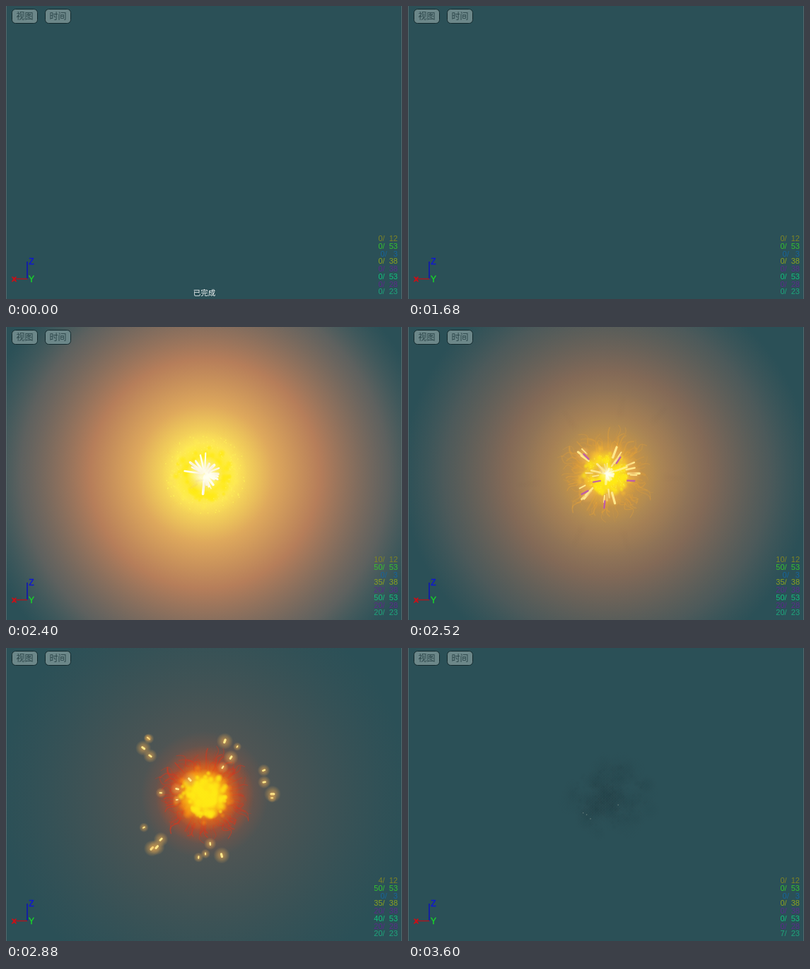
An HTML page with a canvas that plays this animation: 560 px wide and 415 px high, repeating every 3.72 s.

```html
<!DOCTYPE html>
<html lang="zh">
<head>
<meta charset="utf-8">
<title>Particle burst</title>
<style>
  html, body { margin: 0; width: 100%; height: 100%; overflow: hidden; background: #2b5057; }
  #stage { position: relative; width: 560px; height: 415px; overflow: hidden; }
  canvas, svg { position: absolute; left: 0; top: 0; }
  text { white-space: pre; font: 11px "Liberation Sans", Arial, sans-serif; }
  .cjk { font-family: "Noto Sans CJK SC", "Noto Sans CJK", sans-serif; text-anchor: middle; }
  .button rect { fill: #6c8789; stroke: #142a2e; }
  .button text { font-size: 12px; fill: #294347; }
  #done { font-size: 10.5px; fill: #f4f8f8; }
  .axis path { fill: none; stroke-width: 1.5; }
  .axis text { font-size: 12px; text-anchor: middle; stroke-width: .4; }
  .axis .x { font-size: 9px; stroke-width: 1.2; }
  #counters text { text-anchor: end; }
</style>
</head>
<body>
<div id="stage">
  <canvas id="view" width="560" height="415"></canvas>
  <svg width="560" height="415" viewBox="0 0 560 415">
    <path d="M.5 0V415M559.5 0V415" stroke="#657577" opacity=".7"/>
    <g class="button">
      <rect x="8.5" y="4.5" width="36" height="20" rx="5"/>
      <text class="cjk" x="26.5" y="19">视图</text>
      <rect x="55.5" y="4.5" width="36" height="20" rx="5"/>
      <text class="cjk" x="73.5" y="19">时间</text>
    </g>
    <g class="axis">
      <path d="M30 362V386" stroke="#0c12b8"/>
      <path d="M12 386.5H30" stroke="#a81820"/>
      <text class="x" x="11.5" y="390" fill="#c81018" stroke="#c81018">X</text>
      <text x="36" y="366" fill="#1018d0" stroke="#1018d0">Z</text>
      <text x="36" y="391" fill="#18d828" stroke="#18d828">Y</text>
    </g>
    <g id="counters"></g>
    <text id="done" class="cjk" x="280.5" y="410">已完成</text>
  </svg>
</div>
<script>
const LOOP = 3720, STEP = 120, FIRST = 360, BURST = 2280;
const CX = 281, CY = 208, TAU = 2 * Math.PI;
const ctx = document.getElementById('view').getContext('2d');
const done = document.getElementById('done');

// each emitter: live particles fall from peak to none between two ages
const emitters = [
  { color: '#7f8424', total: 12, peak: 10, from: 420, to: 720 },
  { color: '#34c22e', total: 53, peak: 50, from: 650, to: 1250 },
  { color: '#17659c', total: 3, peak: 0, from: 0, to: 1 },
  { color: '#8ca21f', total: 38, peak: 35, from: 660, to: 1270 },
  { color: '#5c2a8a', total: 38, peak: 20, from: 600, to: 1080 },
  { color: '#12c07c', total: 53, peak: 50, from: 540, to: 840 },
  { color: '#5c2a8a', total: 28, peak: 20, from: 600, to: 1080 },
  { color: '#1fa57c', total: 23, peak: 20, from: 1000, to: 1500 }
];

// main directions of the sparks, as offsets after 600 ms
const jets = [[-68, -62], [44, -56], [78, -16], [-82, 62], [4, 90], [-42, -12]];

const ramp = (age, a, b) => Math.min(1, Math.max(0, (age - a) / (b - a)));
const ease = (age, a, b) => { const x = ramp(age, a, b); return x * x * (3 - 2 * x); };
const pulse = (age, a, b, c, d) => ease(age, a, b) * (1 - ease(age, c, d));
const mix = (p, q, k) => p.map((v, i) => Math.round(v + (q[i] - v) * k));
const rgba = (rgb, a) => `rgba(${rgb},${a})`;

function random(seed) {
  return () => {
    seed = seed + 0x6d2b79f5 | 0;
    let x = Math.imul(seed ^ seed >>> 15, 1 | seed);
    x = x + Math.imul(x ^ x >>> 7, 61 | x) ^ x;
    return ((x ^ x >>> 14) >>> 0) / 4294967296;
  };
}

function radial(x, y, r, stops) {
  const g = ctx.createRadialGradient(x, y, 0, x, y, r);
  for (const [p, rgb, a] of stops) g.addColorStop(p, rgba(rgb, a));
  ctx.fillStyle = g;
  ctx.fillRect(x - r, y - r, 2 * r, 2 * r);
}

// a disc of one colour that is solid inside and soft at the rim
const soft = (x, y, r, rgb, alpha, solid = 0) =>
  radial(x, y, r, [[0, rgb, alpha], [solid, rgb, alpha], [1, rgb, 0]]);

function cloud(seed, n, x, y, R, min, max, rgb, alpha, solid) {
  const rnd = random(seed);
  for (let i = 0; i < n; i++) {
    const a = rnd() * TAU, d = R * rnd() ** .7, s = min + (max - min) * rnd();
    soft(x + d * Math.cos(a), y + d * Math.sin(a) * .92, s, rgb, alpha, solid);
  }
}

function streak(x, y, a, len, width, rgb, alpha) {
  const dx = len * Math.cos(a), dy = len * Math.sin(a);
  ctx.strokeStyle = rgba(rgb, alpha);
  ctx.lineWidth = width;
  ctx.beginPath();
  ctx.moveTo(x - dx, y - dy);
  ctx.lineTo(x + dx, y + dy);
  ctx.stroke();
}

const flash = age => (.4 + .6 * ramp(age, 0, 120)) * (1 - ease(age, 120, 360));

function glow(age) {
  const warm = pulse(age, 0, 240, 360, 1000), stops = [];
  for (let p = 0; p <= 1; p += .125) stops.push([p, '128,91,79', .95 * warm * (1 - p) ** 1.2]);
  radial(CX, CY, 290, stops);

  const hot = flash(age);
  radial(CX, CY, 250 + 75 * hot, [
    [0, '255,252,190', hot], [.13, '254,230,88', hot], [.3, '222,168,92', hot],
    [.5, '186,127,90', hot * .97], [.8, '126,108,100', hot * .6], [1, '95,105,102', 0]]);
}

function darkWisps(age) {
  const alpha = .07 * pulse(age, 200, 360, 360, 600), rnd = random(23);
  for (let i = 0; i < 7; i++) {
    const a = (i + rnd() * .7) / 7 * TAU, r = 80 + 20 * rnd();
    for (let d = 0; d < 30; d += 5)
      soft(CX + (r + d) * Math.cos(a), CY + (r + d) * Math.sin(a), 10 - d / 8, '36,28,28', alpha);
  }
}

function smoke(age) {
  const k = pulse(age, 540, 960, 940, 1440), drift = ramp(age, 960, 1320);
  if (!k) return;
  const x = 279 + 7 * drift, y = 198 + 13 * drift, R = 70 - 10 * drift;
  cloud(88, 130, x, y, R, 9, 23, '14,36,42', .2 * k);
  cloud(91, 120, x, y, R * .85, 2, 5, '10,30,36', .3 * k);
}

function wisps(rgb, alpha) {
  const rnd = random(31);
  for (let i = 0; i < 110; i++) {
    const a = rnd() * TAU, r = 28 + 20 * rnd(), len = 10 + 18 * rnd(), bend = (rnd() - .5) * .5;
    const p = (d, b) => [CX + d * Math.cos(a + b), CY + d * Math.sin(a + b)];
    ctx.strokeStyle = rgba(rgb, alpha * (.35 + .65 * rnd()));
    ctx.lineWidth = .8 + 1.4 * rnd();
    ctx.beginPath();
    ctx.moveTo(...p(r, 0));
    ctx.bezierCurveTo(...p(r + len * .4, bend), ...p(r + len * .7, -bend), ...p(r + len, bend * .6));
    ctx.stroke();
  }
}

function fire(age) {
  const life = 1 - ease(age, 600, 900);
  if (!life) return;
  const cool = ease(age, 340, 600), grown = ease(age, 100, 360);
  const outer = mix([222, 146, 48], [222, 74, 26], cool);

  soft(CX, CY, 118 - 28 * cool, mix([205, 128, 70], [180, 84, 55], cool), .6 * life * grown, .25);
  soft(CX, CY, 72 - 2 * cool, outer, .75 * life * grown, .4);
  cloud(7, 60, CX, CY, 50, 6, 14, outer, .22 * life * grown);
  wisps(mix([236, 165, 55], [205, 58, 34], cool), .7 * life * grown);

  const core = 1 - ease(age, 600, 860), hot = flash(age);
  const R = 26 + 16 * (1 - ease(age, 120, 340)) + 9 * cool;
  const orange = mix([255, 150, 16], [255, 238, 80], hot);
  soft(CX, CY, R * 1.45, orange, .75 * core, .35);
  cloud(12, 80, CX, CY, R * 1.25, 4, 9, orange, .4 * core, .2);
  soft(CX, CY, R * 1.05, '255,234,20', .9 * core, .45);
  cloud(5, 90, CX, CY, R * .98, 3, 8, '255,234,20', .65 * core, .25);

  if (hot) star(hot);
}

function star(k) {
  const rnd = random(19);
  soft(CX, CY, 26 * k, '255,255,225', .9 * k, .3);
  ctx.lineCap = 'round';
  for (let i = 0; i < 26; i++) {
    const a = rnd() * TAU, r = (8 + 9 * rnd()) * k;
    streak(CX + r * Math.cos(a), CY + r * Math.sin(a), a, r * .75, 1 + 3 * rnd(), '255,255,240', k);
  }
  ctx.fillStyle = rgba('255,244,90', .7 * k);
  for (let i = 0; i < 120; i++) {
    const a = rnd() * TAU, r = (34 + 24 * rnd()) * k;
    ctx.fillRect(CX + r * Math.cos(a), CY + r * Math.sin(a), 1.5, 1.5);
  }
}

function sparks(age) {
  const alpha = pulse(age, 100, 240, 600, 940);
  if (!alpha) return;
  const travel = age / 600, len = 1.8 + 5.5 * (1 - ease(age, 330, 600));
  const violet = alpha * (1 - ease(age, 340, 520)), rnd = random(63);
  ctx.lineCap = 'round';
  for (const [jx, jy] of jets) {
    for (let i = 0; i < 4; i++) {
      const dx = jx + 42 * (rnd() - .5), dy = jy + 42 * (rnd() - .5), s = .5 + .6 * rnd();
      const x = CX + dx * travel, y = CY + dy * travel, a = Math.atan2(dy, dx);
      soft(x, y, 11 * s, '225,165,80', alpha * .75);
      streak(x, y, a, len * s, 3 * s, '255,232,140', alpha);
      if (i === 3) streak(x * .9 + CX * .1, y + 8, a, 5, 2.4, '182,76,190', violet * .8);
    }
  }
  // one longer ray up to the right
  streak(CX + 50 * travel, CY - 17 * travel, -.33, 22 * travel, 3, '255,240,130', violet);
}

function embers(age) {
  const alpha = .85 * pulse(age, 600, 900, 960, 1220);
  for (const [x, y] of [[270, 183], [328, 198], [279, 217], [271, 244]]) {
    soft(x, y, 7, '170,102,64', alpha * .8);
    soft(x, y, 2, '225,150,85', alpha);
  }
  const rnd = random(9);
  ctx.fillStyle = rgba('150,165,155', .6 * pulse(age, 720, 960, 1300, 1440));
  for (let i = 0; i < 4; i++) ctx.fillRect(235 + 85 * rnd(), 163 + 85 * rnd(), 1.4, 1.4);
}

const labels = emitters.map(({ color }, i) => {
  const el = document.createElementNS('http://www.w3.org/2000/svg', 'text');
  el.setAttribute('x', 554);
  el.setAttribute('y', Math.round(333 + i * 10.75));
  el.setAttribute('fill', color);
  return document.getElementById('counters').appendChild(el);
});

function draw(t) {
  // the loop opens on a still view, then joins the tail of a burst
  let age = -1;
  if (t >= BURST) age = t - BURST;
  else if (t >= FIRST && t < 1560) age = t + 240;

  ctx.fillStyle = '#2b5057';
  ctx.fillRect(0, 0, 560, 415);
  if (age >= 0) [glow, darkWisps, smoke, fire, sparks, embers].forEach(part => part(age));

  emitters.forEach(({ total, peak, from, to }, i) => {
    const born = .5 + .5 * ramp(age, 0, 120);
    const count = age < 0 ? 0 : Math.round(peak * born * (1 - ramp(age, from, to)));
    labels[i].textContent = count + '/' + String(total).padStart(4);
  });
  done.style.display = t < FIRST ? '' : 'none';
}

let shown = -1;
const start = performance.now();
function tick() {
  const time = (performance.now() - start) % LOOP;
  const t = time < FIRST ? 0 : Math.floor(time / STEP) * STEP;
  if (t !== shown) draw(shown = t);
  requestAnimationFrame(tick);
}
tick();
</script>
</body>
</html>
```
